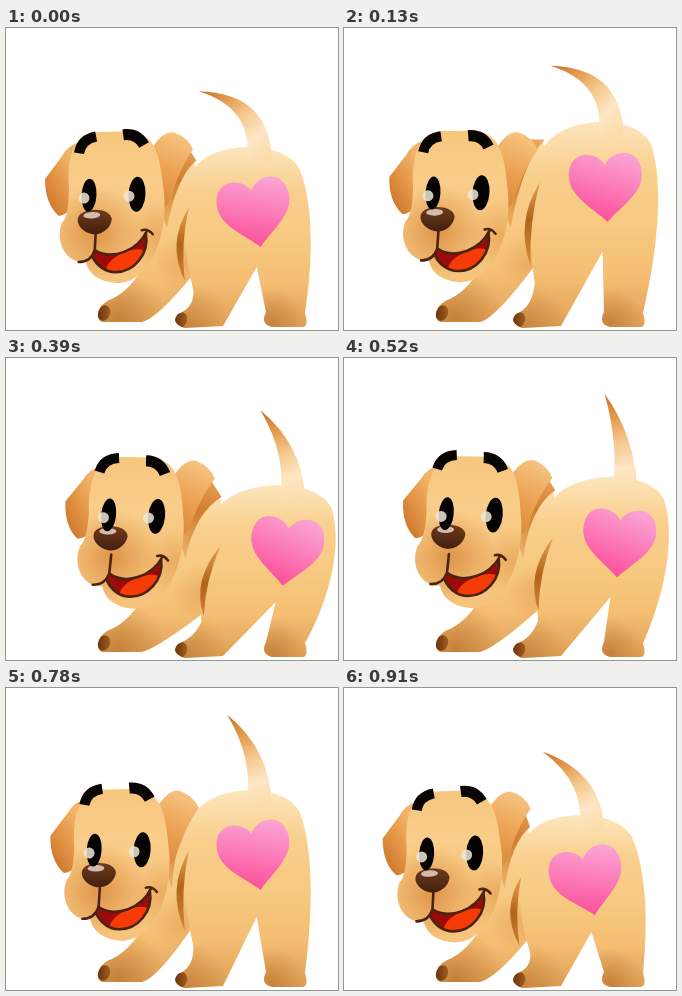
Animation of 332 by 302 pixels, one loop 1040 ms. Source, as an HTML page with a canvas:

```html
<!DOCTYPE html>
<html lang="en">
<head>
<meta charset="utf-8">
<title>Wagging puppy</title>
<style>
  html, body { margin: 0; width: 100%; height: 100%; overflow: hidden; background: #fff; }
  canvas { display: block; }
</style>
</head>
<body>
<canvas id="stage" width="332" height="302"></canvas>
<script>
const ctx = document.getElementById('stage').getContext('2d');
const STEP = 130, STEPS = 8;
const { sin, cos, max, PI } = Math;
const radians = deg => deg * PI / 180;

// The hips swing in a figure eight; the head follows a little late, the tail later still.
function poseAt(step) {
  const swing = (step - 3) * 2 * PI / STEPS;
  const wag = cos(swing - 3 * PI / 8);
  const hip = [11 + 18.5 * cos(swing), -7 + 17 * cos(2 * swing) + 8.5 * sin(2 * swing)];
  return {
    hip, wag,
    head: [10 + 10 * cos(swing - .35), -5 - 5.2 * cos(swing - .7)],
    browLift: -2 + 3 * cos(swing + .6),
    heartAngle: -3 + 9 * cos(swing),
    // Places a rest position that follows the hips by the given weight.
    at: (x, y, weight) => `${x + weight * hip[0]} ${y + weight * hip[1]} `
  };
}

function gradient(x0, y0, x1, y1, ...colors) {
  const g = ctx.createLinearGradient(x0, y0, x1, y1);
  colors.forEach((c, i) => g.addColorStop(i / (colors.length - 1), c));
  return g;
}

function glow(x, y, r, rgb, alpha) {
  const g = ctx.createRadialGradient(x, y, 0, x, y, r);
  g.addColorStop(0, `rgba(${rgb},${alpha})`);
  g.addColorStop(1, `rgba(${rgb},0)`);
  ctx.fillStyle = g;
  ctx.fillRect(x - r, y - r, 2 * r, 2 * r);
}

// Fills a path; extra shading is kept inside it.
function shape(path, fill, shade) {
  const area = new Path2D(path);
  ctx.fillStyle = fill;
  ctx.fill(area);
  if (!shade) return;
  ctx.save();
  ctx.clip(area);
  shade();
  ctx.restore();
}

function oval(x, y, rx, ry, fill, angle = 0) {
  ctx.beginPath();
  ctx.ellipse(x, y, rx, ry, radians(angle), 0, 7);
  ctx.fillStyle = fill;
  ctx.fill();
}

function line(path, width, color = '#4b2411') {
  ctx.lineWidth = width;
  ctx.strokeStyle = color;
  ctx.stroke(new Path2D(path));
}

function group(x, y, angle, cx, cy, draw) {
  ctx.save();
  ctx.translate(x + cx, y + cy);
  ctx.rotate(radians(angle));
  ctx.translate(-cx, -cy);
  draw();
  ctx.restore();
}

const toe = (x, y) => oval(x, y, 6, 8, gradient(x - 6, y, x + 7, y, '#6b3410', '#a4601f'), 18);

const furColor = hip => gradient(0, 117 + hip[1], 0, 300, '#fde6bd', '#f9cf8d', '#f7c981', '#f4be73', '#dfa055');

function drawFront({ hip, head: [hx, hy], at }) {
  shape(`M${at(190, 132, .8)}C${at(150, 150, .5)}${at(155, 200, .2)}141 233Q125 262 106 271
    C90 276 88 294 98 294L136 294Q152 290 ${at(188, 246, .5)}L${at(200, 180, .8)}Z`, furColor(hip), () => {
    glow(112, 290, 48, '178,104,36', .6);
    glow(178 + hip[0] * .6, 235, 30, '216,137,56', .35);
    toe(98, 285);
  });
  shape(`M${176 + hx} ${112 + hy / 2}L${at(192, 131, .8)}Q${at(172, 148, .6)}${160 + hx} 200L${150 + hx} 170Z`,
    gradient(160 + hx, 190, 190 + hx, 118, '#e8aa5e', '#cf7c30', '#eda456'));
}

function drawRump({ hip, at }) {
  shape(`M${at(190, 140, .8)}C${at(205, 112, 1)}${at(280, 108, 1)}${at(296, 140, 1)}
    C${at(311, 180, .9)}${at(307, 240, .5)}299 285Q303 298 297 299L266 299Q254 296 260 284
    L${at(252, 238, .6)}L217 298L178 300Q164 294 172 286Q188 280 ${at(188, 262, .25)}
    Q${at(172, 200, .7)}${at(190, 140, .8)}Z`, furColor(hip), () => {
    glow(182, 297, 42, '178,104,36', .5);
    glow(266, 294, 34, '178,104,36', .55);
    toe(175, 292);
  });
  // hip crease
  const [x, y] = hip;
  shape(`M${at(185, 178, 1)}Q${at(162, 214, .8)}${at(180, 252, .6)}Q${at(176, 214, .8)}${at(185, 178, 1)}Z`,
    gradient(0, 180 + y, 0, 250 + y, '#e3a052', '#b2641c', '#c98236'));
}

function drawTail({ hip, wag }) {
  const x = 243 + hip[0] * 1.05, y = 131 + hip[1];
  const tipX = x - 28 + 22 * wag, tipY = y - 83 - 15 * wag;
  const curl = 16 * max(0, -wag) ** 2;
  shape(`M${tipX} ${tipY}Q${x + 23} ${y - 54 - curl} ${x + 25} ${y}Q${x + 12} ${y + 7} ${x} ${y}
    Q${x + 7} ${y - 44 - curl * .6} ${tipX} ${tipY}Z`,
    gradient(tipX, tipY, x + 14, y + 3, '#c8701f', '#e39b4c', '#f5c98f', '#fde6c4', '#fbdcab'));
}

function drawHeart({ hip, heartAngle }) {
  group(251 + hip[0], 183 + hip[1], heartAngle, 0, 0, () => {
    shape('M0-22C7-37 36-40 36.5-12C37 8 13 21 0 35C-13 21-37 8-36.5-12C-36-40-7-37 0-22Z',
      gradient(14, -34, -9, 34, '#fba4d3', '#fb7ab7', '#fb4d98'));
  });
}

function drawMouth() {
  shape('M88 222C106 233 131 222 139 204C143 226 127 244 109 244C97 244 88 235 86 229Z', '#9c0b0a',
    () => oval(120, 234, 22, 10, '#f63b06', -25));
  line('M89 203L88 222C106 233 131 222 140 203M135 202Q141 200 146 206', 2.6);
  line('M88 222Q84 234 72 234M86 229C90 237 98 244 109 244C127 244 143 226 139 205', 2.6);
}

function drawNose() {
  shape('M71 191C72 179 104 178 105 191C104 200 96 206 88 206C80 206 70 199 71 191Z',
    gradient(0, 182, 0, 206, '#6f3b1c', '#42200e'));
  oval(85, 187, 8.5, 3.3, '#d3bcae', -3);
}

function drawBrows() {
  ctx.lineCap = 'butt';
  line('M72 128Q74 114 89 111', 10, '#080503');
  line('M116 109Q130 107 137 119', 11, '#080503');
}

function drawHead({ head: [x, y], browLift }) {
  const tilt = x * .15;
  group(x, y / 2, tilt, 105, 190, () => {
    shape('M72 114Q60 118 55 128L38 151Q38 176 52 188Q68 186 70 160Z',
      gradient(38, 165, 72, 145, '#d27d30', '#e5984a', '#f1b468'));
    shape('M146 118Q156 103 166 104Q180 108 186 121Q174 138 167 160Q162 178 152 184Z',
      gradient(150, 172, 174, 108, '#dc8c3c', '#eda456', '#f6c380'));
    shape(`M62 160C60 130 66 104 92 104L122 103C150 105 153 130 157 165C161 205 145 255 110 255
      C92 254 82 246 79 234C58 236 48 212 55 195Q62 188 62 160Z`,
      gradient(0, 103, 0, 255, '#f7c67d', '#f9cd8a', '#f5c27a', '#f6c47c'), () => {
        glow(88, 205, 46, '211,125,48', .65);
        glow(152, 208, 34, '216,137,56', .4);
      });
  });
  group(x, y, tilt, 105, 190, () => {
    group(-x * .12, -y * .4, 0, 0, 0, drawMouth);
    group(-x * .15, y * .4, 0, 0, 0, drawNose);
    oval(82, 167, 7.5, 16.5, '#050302', 3);
    oval(130, 166, 8.5, 17.5, '#050302', 3);
    for (const [ex, ey] of [[77, 170], [122, 168]]) oval(ex, ey, 5.5, 5.5, 'rgba(238,230,215,.85)');
    group(0, browLift, x * .35, 104, 115, drawBrows);
  });
}

function frame(now) {
  const pose = poseAt(Math.floor(now / STEP) % STEPS);
  ctx.fillStyle = '#fff';
  ctx.fillRect(0, 0, 332, 302);
  ctx.lineCap = ctx.lineJoin = 'round';
  for (const draw of [drawFront, drawRump, drawTail, drawHeart, drawHead]) draw(pose);
  requestAnimationFrame(frame);
}
frame(performance.now());
</script>
</body>
</html>
```
